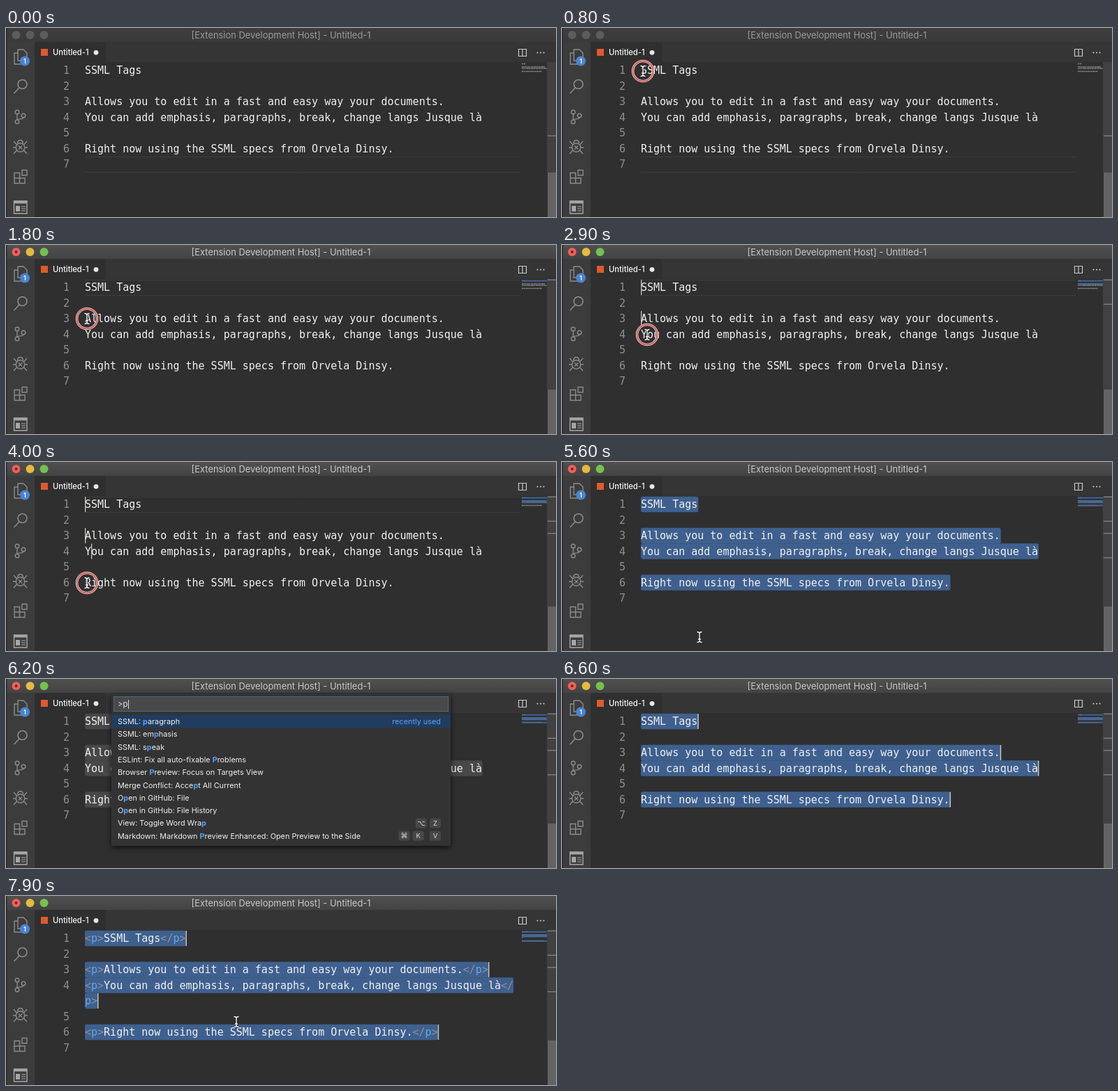
Write an HTML page with a canvas that moves like this. It is 788x272 px and loops after 8000 ms.

```html
<!DOCTYPE html>
<html lang="en">
<head>
<meta charset="utf-8">
<title>SSML editing</title>
<style>
html, body { margin: 0; width: 788px; height: 272px; overflow: hidden; background: #2f2f2f; }
canvas { display: block; }
</style>
</head>
<body>
<canvas id="stage" width="788" height="272"></canvas>
<script>
const ctx = document.getElementById('stage').getContext('2d');
const LOOP = 8000, LEFT = 113, ROW = 22.5, CH = 9.03, WRAP = 68;
const MONO = '15px "DejaVu Sans Mono", "Liberation Mono", monospace';
const ui = (size, weight = 400) => `${weight} ${size}px Inter, Roboto, sans-serif`;

const plain = [
  'SSML Tags', '',
  'Allows you to edit in a fast and easy way your documents.',
  'You can add emphasis, paragraphs, break, change langs Jusque là', '',
  'Right now using the SSML specs from Orvela Dinsy.', ''
];
const tagged = plain.map(s => s && `<p>${s}</p>`);

// An asterisk marks the letter matched by the query.
const commands = [
  ['SSML: *paragraph'], ['SSML: em*phasis'], ['SSML: s*peak'],
  ['ESLint: Fix all auto-fixable *Problems'],
  ['Browser *Preview: Focus on Targets View'],
  ['Merge Conflict: Acce*pt All Current'],
  ['O*pen in GitHub: File'], ['O*pen in GitHub: File History'],
  ['View: Toggle Word Wra*p', '⌥Z'],
  ['Markdown: Markdown *Preview Enhanced: Open Preview to the Side', '⌘K V']
];

// time, x, y
const path = [
  [200, 300, 290], [750, 116, 62], [1150, 116, 62], [1650, 116, 106], [2100, 116, 106],
  [2700, 122, 129], [3250, 122, 129], [3850, 116, 174], [4300, 116, 174], [4900, 197, 252],
  [7500, 197, 252], [7850, 330, 181], [8000, 330, 181]
];
const clicks = [[780, 980], [1740, 2000], [2900, 3150], [3920, 4200]];
const blinkStarts = [850, 1900, 3000, 4050, 5000, 6500, 6700];

const T = { focus: 850, select: 5000, open: 5900, type: 6100, close: 6500, insert: 6700, mouse: 7500 };
const rowY = i => 61 + i * ROW;

function rect(x, y, w, h, color) {
  ctx.fillStyle = color;
  ctx.fillRect(x, y, w, h);
}

function round(x, y, w, h, r, color) {
  ctx.fillStyle = color;
  ctx.beginPath();
  ctx.roundRect(x, y, w, h, r);
  ctx.fill();
}

function disc(x, y, r, color) {
  ctx.fillStyle = color;
  ctx.beginPath();
  ctx.arc(x, y, r, 0, Math.PI * 2);
  ctx.fill();
}

function text(s, x, y, font, color, align = 'left') {
  ctx.font = font;
  ctx.fillStyle = color;
  ctx.textAlign = align;
  ctx.fillText(s, x, y);
  return x + ctx.measureText(s).width;
}

function stroke(d, color, width = 1.4) {
  ctx.strokeStyle = color;
  ctx.lineWidth = width;
  ctx.stroke(new Path2D(d));
}

const circle = (x, y, r) => `M${x + r} ${y}a${r} ${r} 0 1 1 ${-2 * r} 0a${r} ${r} 0 1 1 ${2 * r} 0`;

function drawTitle(focused) {
  const shade = ctx.createLinearGradient(0, 0, 0, 20);
  shade.addColorStop(0, focused ? '#505050' : '#3e3e3e');
  shade.addColorStop(1, focused ? '#434343' : '#3a3a3a');
  rect(0, 0, 788, 20, shade);
  const lights = focused ? ['#f0605a', '#e4bb3f', '#74c24e'] : ['#5c5c5c', '#5c5c5c', '#5c5c5c'];
  lights.forEach((c, i) => disc(14.5 + i * 20, 10, 6, c));
  if (focused) disc(14.5, 10, 2, '#7c1f1c');
  text('[Extension Development Host] - Untitled-1', 394, 14.5, ui(12.92), focused ? '#c8c8c8' : '#9b9b9b', 'center');
}

function drawSidebar() {
  const c = '#8c8c8c', light = '#a6a6a6';
  rect(0, 20, 41, 252, '#3c3c3c');
  stroke('M17 36V31H25L30 36V47H17V36M17 36H12V52H24V47', c);
  disc(27, 47.5, 7, '#4a84d2');
  text('1', 27, 50.8, ui(9, 600), '#fff', 'center');
  stroke(circle(23.5, 81, 6.5) + 'M19 86L11.5 94', c, 1.6);
  stroke(circle(16, 121, 2.8) + circle(25, 126, 2.8) + circle(16, 135, 2.8) +
    'M16 124V132M25 129C25 132 18 130 16 132', c);
  stroke(circle(20.5, 172, 6.2) + 'M18 169.5L23 174.5M23 169.5L18 174.5M16.5 166C17 160 24 160 24.5 166' +
    'M11 163L15.5 168M30 163L25.5 168M10 172H14M27 172H31M11 181L15.5 176M30 181L25.5 176', c);
  stroke('M12 208.5H19.5V216H27V223.5H12ZM12 216H19.5V223.5M23 204.5H30V212H23Z', c);
  stroke('M11.5 249H30V267H11.5Z', light);
  rect(11, 249, 19, 3.5, light);
  rect(14, 256, 6, 8, light);
  stroke('M22 257H28M22 260H28M22 263H28', light, 1.2);
}

function drawTabs() {
  rect(41, 20, 747, 29, '#353535');
  rect(41, 20, 102, 29, '#2f2f2f');
  rect(50, 30, 10, 10, '#e0592e');
  text('Untitled-1', 67, 39, ui(11.2, 500), '#f6f6f6');
  disc(129, 35.3, 3.4, '#e8e8e8');
  stroke('M734.5 30.5H745.5V40.5H734.5ZM740 30.5V40.5', '#c8c8c8', 1.2);
  for (let i = 0; i < 3; i++) disc(761.5 + i * 4.5, 35.5, 1.1, '#c8c8c8');
}

function layout(lines) {
  const rows = [];
  lines.forEach((s, i) => {
    rows.push({ s: s.slice(0, WRAP), n: i + 1, end: s.length <= WRAP });
    if (s.length > WRAP) rows.push({ s: s.slice(WRAP), end: true });
  });
  return rows;
}

function drawCode(s, y) {
  let x = LEFT;
  for (const part of s.split(/(<\/?|>)/)) {
    const color = /[<>]/.test(part) ? '#8b9199' : part === 'p' ? '#67a6e2' : '#efefef';
    text(part, x, y + 5, MONO, color);
    x += part.length * CH;
  }
}

function drawRuler(marked) {
  rect(775, 49, 13, 159, '#414141');
  rect(776, 208, 12, 64, '#636363');
  for (const n of marked) rect(776, 49.5 + (n - 1) * 17.5, 12, 1.5, '#7c7c7c');
}

function drawMinimap(rows, marked) {
  rows.forEach((row, i) => {
    if (!row.s) return;
    const y = 50.5 + i * 2.2, blue = marked.includes(row.n);
    if (blue) rect(739, y, 37, 2.2, '#3f608f');
    ctx.globalAlpha = blue ? 0.2 : 0.75;
    for (let k = 0; k < Math.min(row.s.length, 62); k++)
      if (row.s[k] !== ' ') rect(739 + k * 0.58, y + 0.3, 0.5, 1.4, '#ccc');
    ctx.globalAlpha = 1;
  });
}

// Carets placed one by one before the selection: [time, row, column]
const placed = [[850, 0, 0], [1900, 2, 0], [3000, 3, 1], [4050, 5, 0]];

function drawEditor(t) {
  const rows = layout(t < T.insert ? plain : tagged);
  const selected = t >= T.select;
  const palette = t >= T.open && t < T.close;
  const start = blinkStarts.filter(b => b <= t).pop();
  const lit = start !== undefined && !palette && (t - start) % 1000 < 500;

  if (!selected) {
    const y = Math.round(t < T.focus ? rowY(6) : rowY(0));
    stroke(`M${LEFT} ${y - 10.5}H736M${LEFT} ${y + 11.5}H736`, '#3d3d3d', 1);
  }
  rows.forEach((row, i) => {
    const y = rowY(i), w = row.s.length * CH;
    if (selected && w) round(LEFT, y - 11.25, w + (row.end && t < T.insert ? 1 : 0), ROW, 2.5, palette ? '#484848' : '#3f608f');
    if (row.n) text(row.n, 91, y + 5, MONO, '#8f8f8f', 'right');
    drawCode(row.s, y);
    if (lit && selected && w && row.end) rect(LEFT + w, y - 11, 1.5, 22, '#c9c5b9');
  });
  if (lit && !selected)
    for (const [at, r, col] of placed)
      if (t >= at) rect(LEFT + col * CH, rowY(r) - 11, 1.3, 22, '#c9c5b9');

  const marks = t < T.focus ? [7] : placed.filter(p => t >= p[0]).map(p => p[1] + 1);
  drawMinimap(rows, marks);
  drawRuler(marks);
}

function drawKeys(keys, y) {
  let x = 615;
  for (const k of [...keys].reverse()) {
    if (k === ' ') { x -= 4; continue; }
    round(x - 8, y - 7, 16, 14, 3, '#474747');
    const font = k > '~' ? '10px "DejaVu Sans", sans-serif' : ui(9.5);
    text(k, x, y + 3.5, font, '#dcdcdc', 'center');
    x -= 20.3;
  }
}

function drawPalette(typed) {
  ctx.save();
  ctx.shadowColor = 'rgba(0,0,0,.65)';
  ctx.shadowBlur = 8;
  ctx.shadowOffsetY = 3;
  rect(151, 21, 486, 219, '#333');
  ctx.restore();
  rect(154, 25, 480, 22, '#494949');
  ctx.strokeStyle = '#426f90';
  ctx.lineWidth = 1;
  ctx.strokeRect(154.5, 25.5, 479, 21);
  const end = text(typed ? '>p' : '>', 160, 40, ui(11.4), '#e4e4e4');
  rect(end + 0.5, 30, 1, 13, '#ddd');
  rect(151, 52, 486, 18.3, '#203d5f');
  commands.forEach(([label, keys], i) => {
    const y = 61 + i * 18.3, font = ui(10.87), color = '#eee';
    const [head, tail] = label.split('*');
    let x = text(head, 160, y + 4, font, color);
    x = text(tail[0], x, y + 4, typed ? ui(10.87, 700) : font, typed ? '#5a9ff8' : color);
    text(tail.slice(1), x, y + 4, font, color);
    if (keys) drawKeys(keys, y);
  });
  text('recently used', 623, 65, ui(10.87), '#5f9ff2', 'right');
}

function pointer(t) {
  const i = path.findIndex(p => p[0] > t);
  const [t0, x0, y0] = path[i - 1], [t1, x1, y1] = path[i];
  const u = (t - t0) / (t1 - t0), e = u * u * (3 - 2 * u);
  return [x0 + (x1 - x0) * e, y0 + (y1 - y0) * e];
}

function drawPointer(t) {
  if (t < path[0][0] || (t >= T.open && t < T.mouse)) return;
  const [x, y] = pointer(t);
  if (clicks.some(([a, b]) => t >= a && t < b)) {
    const ring = circle(x, y, 14.5);
    stroke(ring, '#ecc9c7', 3.6);
    stroke(ring, '#cf5f5c', 1.8);
  }
  const beam = `M${x - 3.5} ${y - 7.5}Q${x} ${y - 7.5} ${x} ${y - 5}V${y + 5}Q${x} ${y + 7.5} ${x - 3.5} ${y + 7.5}` +
    `M${x + 3.5} ${y - 7.5}Q${x} ${y - 7.5} ${x} ${y - 5}M${x + 3.5} ${y + 7.5}Q${x} ${y + 7.5} ${x} ${y + 5}M${x - 2} ${y + 3}H${x + 2}`;
  stroke(beam, '#222', 3);
  stroke(beam, '#f4f4f4', 1.4);
}

function draw(t) {
  rect(0, 0, 788, 272, '#2f2f2f');
  drawTabs();
  drawEditor(t);
  drawSidebar();
  drawTitle(t >= T.focus);
  rect(0, 0, 1.5, 272, '#2a2a2a');
  if (t >= T.open && t < T.close) drawPalette(t >= T.type);
  drawPointer(t);
}

const begin = performance.now();
function frame() {
  draw((performance.now() - begin) % LOOP);
  requestAnimationFrame(frame);
}
frame();
</script>
</body>
</html>
```
